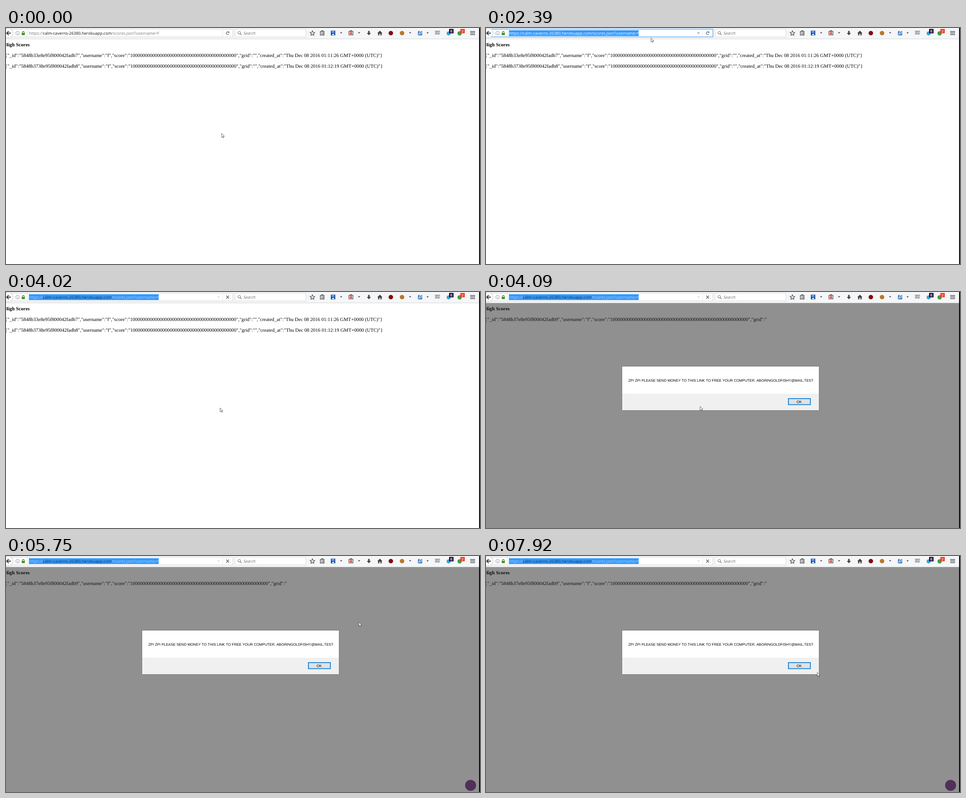
Recreate the animation shown at these times as an HTML page with a canvas. Size 1058 by 529 pixels, loop 7990 ms.

```html
<!DOCTYPE html>
<html>
<head>
<meta charset="utf-8">
<style>
html, body { margin: 0; width: 100%; height: 100%; overflow: hidden; background: #fff; }
canvas { display: block; width: 1058px; height: 529px; }
</style>
</head>
<body>
<canvas id="stage" width="1058" height="529"></canvas>
<script>
const ctx = document.getElementById('stage').getContext('2d');
ctx.textRendering = 'geometricPrecision';
ctx.fontKerning = 'none';

const LOOP = 7990, STEP = 70;
const FOCUS = 1860, LOADING = 3820, ALERT = 4090, CHAT = 4400;
const SERIF = '"Liberation Serif", serif';
const SANS = '"Open Sans", sans-serif';
const ARIAL = '"Liberation Sans", sans-serif';

// Pointer positions: time, x, y
const path = [
  [0, 481, 236], [400, 481, 236], [1230, 341, 117], [2060, 371, 8], [2250, 371, 8],
  [2390, 368, 22], [2520, 368, 22], [3340, 462, 230], [3480, 471, 247], [3610, 471, 247],
  [3680, 472, 253], [3750, 472, 253], [4020, 477.5, 259.5], [4090, 477.5, 256], [4560, 380, 226],
  [4840, 336.5, 204.5], [5050, 580, 87], [5260, 883, 200], [5400, 780, 352], [5540, 575, 290],
  [5720, 760, 148], [5980, 1041, 230], [6240, 720, 308], [6590, 29, 253], [6790, 280, 142],
  [7000, 744, 190], [7080, 735, 300], [7260, 592, 240], [7470, 720, 142], [7700, 853, 230],
  [7920, 739, 260.5], [LOOP, 739, 260.5]
];
const CURVES_FROM = 4090;
// The pointer is sampled every STEP ms, counted from these times
const sampleStarts = [0, 460, 2320, 2590, 3410, 3680, 3820, 4020, 4560];

function pointerAt(time) {
  const start = sampleStarts.filter(s => s <= time).pop();
  const t = start + Math.floor((time - start) / STEP) * STEP;
  const i = Math.max(0, path.findIndex(p => p[0] > t) - 1);
  const a = path[i], b = path[i + 1];
  const before = path[i - 1] || a, after = path[i + 2] || b;
  const u = (t - a[0]) / (b[0] - a[0]);
  const straight = a[0] < CURVES_FROM || b[0] === LOOP;
  return [1, 2].map(k => {
    if (straight) return a[k] + (b[k] - a[k]) * u;
    const m0 = (b[k] - before[k]) * 0.4, m1 = (after[k] - a[k]) * 0.4;
    return a[k] + u * (m0 + u * (3 * (b[k] - a[k]) - 2 * m0 - m1 + u * (2 * (a[k] - b[k]) + m0 + m1)));
  });
}

function rect(x, y, w, h, fill) {
  ctx.fillStyle = fill;
  ctx.fillRect(x, y, w, h);
}

function frame(x, y, w, h, color, width = 1) {
  ctx.strokeStyle = color;
  ctx.lineWidth = width;
  ctx.strokeRect(x, y, w, h);
}

function disc(x, y, r, fill) {
  ctx.fillStyle = fill;
  ctx.beginPath();
  ctx.arc(x, y, r, 0, 7);
  ctx.fill();
}

function ring(x, y, r, color, width = 1) {
  ctx.strokeStyle = color;
  ctx.lineWidth = width;
  ctx.beginPath();
  ctx.arc(x, y, r, 0, 7);
  ctx.stroke();
}

function shape(d, fill, stroke, width = 1, x = 0, y = 0) {
  const p = new Path2D(d);
  ctx.save();
  ctx.translate(x, y);
  if (fill) { ctx.fillStyle = fill; ctx.fill(p); }
  if (stroke) { ctx.strokeStyle = stroke; ctx.lineWidth = width; ctx.stroke(p); }
  ctx.restore();
}

// Draws text and returns the x where it ends
function text(str, x, y, font, color = '#000') {
  ctx.font = font;
  ctx.fillStyle = color;
  ctx.fillText(str, x, y);
  return x + ctx.measureText(str).width;
}

function drawAddress(time) {
  const focused = time >= FOCUS && time < LOADING;
  const selected = time >= FOCUS, loading = time >= LOADING;
  rect(12, 2, 495, 18, '#fff');
  frame(12.5, 2.5, 494, 17.5, focused ? '#1a88f0' : '#d2d3d4');
  rect(47, 3, 1, 17, '#dcdcdc');
  rect(483, 3, 1, 17, '#e4e4e4');

  disc(5, 11, 11, '#fbfbfb');
  ring(5, 11, 11, '#c4c5c6');
  shape('M11 11.5H2M6 7L1.5 11.5L6 16', null, '#3c3c3c', 2);

  ring(26, 11.5, 4.2, '#808080', 0.9);
  rect(25.5, 11, 1, 3, '#808080');
  rect(25.5, 9, 1, 1, '#808080');
  rect(35, 11, 7, 5, '#4a8f2c');
  shape('M36.5 11V9.5A2 2 0 0 1 40.5 9.5V11', null, '#4a8f2c', 1.4);

  if (selected) rect(51, 5, 290, 13, '#3399ff');
  const side = loading ? '#b4cce4' : selected ? '#fff' : '#777';
  const host = loading ? '#12304d' : selected ? '#fff' : '#111';
  const font = '9.05px ' + SANS;
  let x = text('https://', 51.5, 15, font, side);
  x = text('calm-caverns-26380.herokuapp.com', x, 15, font, host);
  text('/scores.json?username=f', x, 15, font, side);

  if (selected) shape('M471 9.5h6.5l-3.2 5z', loading ? '#e4e4e4' : '#b5b5b5');
  if (loading) {
    shape('M491.5 8l6.5 7m0-7l-6.5 7', null, '#555', 1.2);
  } else {
    shape('M497.4 13.3A3.1 3.1 0 1 1 497 9.4', null, '#666', 1.3);
    shape('M498.5 7.6v3.4h-3.4z', '#666');
  }
}

function drawIcons() {
  const dark = '#444', caretXs = [748, 788, 902, 941];
  rect(511, 2, 159, 18, '#fff');
  frame(511.5, 2.5, 158, 17.5, '#d8d9da');
  ring(520.5, 10.5, 2.8, '#777', 1.1);
  shape('M522.5 12.5l3.4 3.5', null, '#777', 1.3);
  text('Search', 530, 15, 'italic 9.05px ' + SANS, '#707070');

  caretXs.forEach(x => shape('M-2.5 9.5h5l-2.5 3z', dark, null, 1, x));
  shape('M0-5.2L1.6-1.7L5.2-1.3L2.5 1.2L3.3 4.9L0 3L-3.3 4.9L-2.5 1.2L-5.2-1.3L-1.6-1.7Z', null, dark, 1.2, 684, 11.5);

  frame(701.5, 7.5, 8.5, 8.5, dark, 1.2);
  rect(704, 5.5, 4, 2.5, dark);
  [9.5, 11.5, 13.5].forEach(y => { rect(703, y, 1.5, 1, dark); rect(705.5, y, 3.5, 1, dark); });

  rect(725, 6, 10, 10.5, '#194fa5');
  rect(727, 7, 6, 3.5, '#8fb2e0');
  rect(728, 13, 4.5, 2.8, '#dce8fa');

  frame(765.5, 7.5, 9, 8, '#5a3030', 1.2);
  rect(768, 5.5, 4, 2, '#5a3030');
  rect(769, 8.8, 2, 5.6, '#d22');
  rect(767.2, 10.6, 5.6, 2, '#d22');

  shape('M808.3 6.5h3.4v4.5h3l-4.7 5.2l-4.7-5.2h3z', dark);
  shape('M834.5 6l5.7 5.5h-1.7v5h-2.8v-3.5h-2.4v3.5h-2.8v-5h-1.7z', dark);

  disc(859, 11.5, 5, '#85090d');
  disc(884, 11.5, 5, '#b9762f');

  rect(919.5, 7, 9.5, 9.5, '#3f7fc1');
  ring(925, 10.5, 2.3, '#eaf4ff', 1.2);
  shape('M923.3 12.3l-2.6 2.8', null, '#eaf4ff', 1.2);

  rect(957.5, 6, 11, 8.5, '#a5a5a5');
  text('CSS', 958.2, 12.3, '5px ' + ARIAL, '#fff');

  disc(988, 12, 4.6, '#36a2df');
  rect(989, 2, 10, 10, '#2b0a30');
  text('0', 991.8, 9.8, 'bold 8px ' + ARIAL, '#fff');
  disc(1012.5, 12, 4.8, '#3f9d48');
  rect(1014, 2, 10, 10, '#e8432f');
  text('2', 1016.8, 9.8, '8px ' + ARIAL, '#fff');

  [7, 10.5, 14].forEach(y => rect(1036, y, 11, 1.5, dark));
}

function scoreRow(id, zeros, rest, y) {
  const row = `{"_id":"5848b3${id}","username":"f","score":"1${'0'.repeat(zeros)}","grid":"${rest}`;
  text(row, -2.4, y, '11.02px ' + SERIF);
}

function created(clock) {
  return `","created_at":"Thu Dec 08 2016 ${clock} GMT+0000 (UTC)"}`;
}

function drawAlert() {
  rect(0, 25, 1056, 504, 'rgba(35,35,37,.5)');
  rect(304, 167, 439, 98, '#fff');
  rect(304, 228, 439, 37, '#f0f0f0');
  frame(303.5, 166.5, 440, 99, '#7d7d7e');
  const font = '8.04px ' + ARIAL;
  text('ZPI ZPI PLEASE SEND MONEY TO THIS LINK TO FREE YOUR COMPUTER. ABORINGOLDFISHY@MAIL.TEST', 317.7, 201, font);
  rect(674, 238, 51, 15, '#e1e1e1');
  frame(675, 239, 49, 13.5, '#0078d7', 1.7);
  text('OK', 693.3, 248.6, font);
}

function drawPointer(time) {
  const [x, y] = pointerAt(time);
  if (y < 19) {
    shape('M-2 0H2M0 0V10M-2 10H2', null, '#333', 0.9, x, y);
  } else {
    shape('M.4.4V9.2L2.4 7.3L3.8 10.3L5.2 9.7L3.9 6.7H6.6Z', '#fff', '#333', 0.75, x, y);
  }
}

function draw(time) {
  rect(0, 0, 1058, 529, '#fff');
  text('High Scores', -3.8, 41.3, 'bold 11.02px ' + SERIF);
  if (time < ALERT) {
    scoreRow('3e8e95f800042fadb7', 42, created('01:11:26'), 65);
    scoreRow('738e95f800042fadb8', 42, created('01:12:19'), 89);
  } else {
    scoreRow('7e8e95f800042fadb9', 55, '', 65);
    drawAlert();
  }
  if (time >= CHAT) disc(1037, 514, 12.3, '#50305a');

  rect(0, 0, 1056, 24, '#f5f6f7');
  rect(0, 24, 1056, 1, '#d3d4d5');
  drawAddress(time);
  drawIcons();
  rect(1056, 0, 2, 529, '#000');
  drawPointer(time);
}

const began = performance.now();
function tick() {
  draw((performance.now() - began) % LOOP);
  requestAnimationFrame(tick);
}
tick();
</script>
</body>
</html>
```
